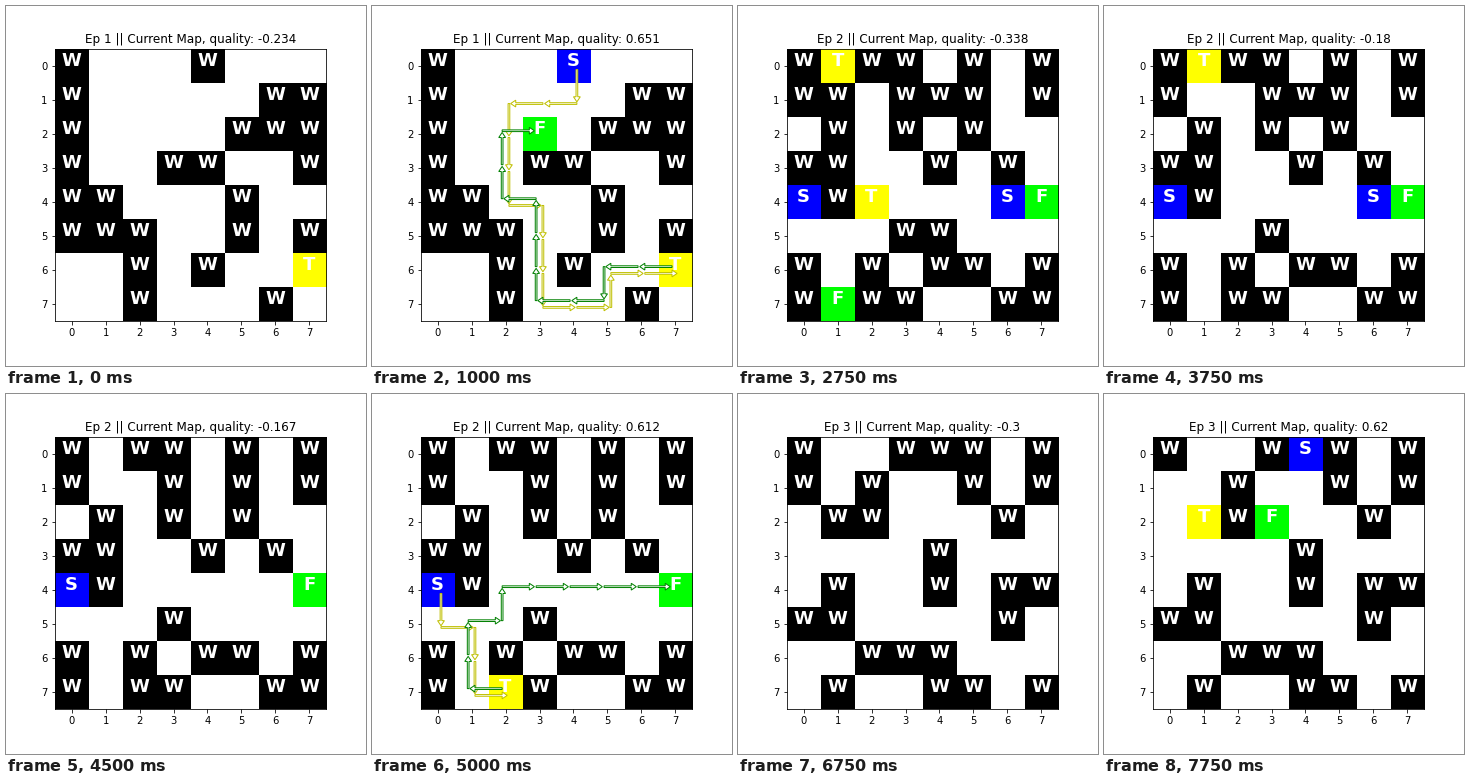
Write a matplotlib script that moves like this. It is 360 px wide and 360 px high and loops after 8000 ms.

```python
import matplotlib.pyplot as plt
import numpy as np
from matplotlib.animation import FuncAnimation

STEP_MS = 250
STEPS = 32
SIZE = 8

COLORS = {".": (255, 255, 255), "W": (0, 0, 0), "S": (0, 0, 255),
          "T": (255, 255, 0), "F": (0, 255, 0)}
MOVES = {"U": (0, -1), "D": (0, 1), "L": (-1, 0), "R": (1, 0)}

# Cost of having zero, one or two cells of a special kind
COUNT_COST = (0.1, 0.0337, 0.1127)

# Edits are (step, row, column, new cell); routes are (color, shift, row, column, moves)
EPISODES = [
    dict(start=0, score=0.651, path_step=4,
         rows="W...W... W.....WW W....WWW W..WW..W "
              "WW...W.. WWW..W.W ..W.W..T ..W...W.",
         edits=[(2, 2, 3, "F"), (3, 0, 4, "S")],
         routes=[("y", 0.1, 0, 4, "DLLDDDRDDDRRURR"),
                 ("g", -0.1, 6, 7, "LLDLLUUULUUR")]),
    dict(start=7, score=0.612, path_step=20,
         rows="WTWW.W.W WW.WWWWW .W.WWW.. WW..W.W. "
              "SWT.W.SF ...WW... W.W.WW.W WFWW..WW",
         edits=[(9, 4, 4, "."), (10, 1, 6, "."), (11, 2, 4, "."),
                (12, 7, 1, "."), (13, 1, 1, "."), (14, 4, 2, "."),
                (15, 5, 4, "."), (16, 0, 1, "."), (17, 4, 6, "."),
                (18, 1, 4, "."), (19, 7, 2, "T")],
         routes=[("y", 0.1, 4, 0, "DRDDR"),
                 ("g", -0.1, 7, 2, "LUURURRRRR")]),
    dict(start=23, score=0.62, path_step=STEPS,
         rows="W..WWW.W W.W..WWW .WW...W. ....W... "
              ".W..W.WW WW....W. ..WWW... .WW.WWWW",
         edits=[(25, 7, 6, "."), (26, 1, 6, "."), (27, 7, 2, "."),
                (28, 1, 0, "."), (29, 2, 1, "T"), (30, 2, 3, "F"),
                (31, 0, 4, "S")],
         routes=[]),
]

fig, ax = plt.subplots(figsize=(5, 5), dpi=72, facecolor="white")
fig.subplots_adjust(left=0.125, right=0.9, bottom=0.125, top=0.88)
image = ax.imshow(np.full((SIZE, SIZE, 3), 255, dtype=np.uint8))
ax.set_xticks(range(SIZE))
ax.set_yticks(range(SIZE))
title = ax.set_title("")
labels = [[ax.text(c, r, "", color="white", size=18, weight="bold", ha="center")
           for c in range(SIZE)] for r in range(SIZE)]


def add_route(color, shift, row, col, moves):
    x, y = col + shift, row + shift
    arrows = []
    for move in moves:
        dx, dy = MOVES[move]
        arrows.append(ax.arrow(x, y, 0.8 * dx, 0.8 * dy, width=0.05,
                               head_width=0.2, head_length=0.15,
                               fc="white", ec=color))
        x, y = x + dx, y + dy
    return arrows


routes = [[arrow for route in ep["routes"] for arrow in add_route(*route)]
          for ep in EPISODES]
ax.set_xlim(-0.5, SIZE - 0.5)
ax.set_ylim(SIZE - 0.5, -0.5)


def grid_at(ep, step):
    grid = [list(row) for row in ep["rows"].split()]
    for when, r, c, cell in ep["edits"]:
        if when <= step:
            grid[r][c] = cell
    return grid


def quality(grid, score):
    counts = [sum(row.count(kind) for row in grid) for kind in "STF"]
    if counts == [1, 1, 1]:
        return score
    return round(-sum(COUNT_COST[n] for n in counts), 3)


def draw(step):
    number = max(i for i, ep in enumerate(EPISODES) if ep["start"] <= step)
    ep = EPISODES[number]
    grid = grid_at(ep, step)
    image.set_data(np.array([[COLORS[cell] for cell in row] for row in grid],
                            dtype=np.uint8))
    for row, texts in zip(grid, labels):
        for cell, text in zip(row, texts):
            text.set_text(cell.strip("."))
    for i, arrows in enumerate(routes):
        for arrow in arrows:
            arrow.set_visible(i == number and step >= ep["path_step"])
    title.set_text(f"Ep {number + 1} || Current Map, "
                   f"quality: {quality(grid, ep['score'])}")
    return []


anim = FuncAnimation(fig, draw, frames=STEPS, init_func=lambda: draw(0),
                     interval=STEP_MS, repeat=True, repeat_delay=0, blit=False)
plt.show()
```
